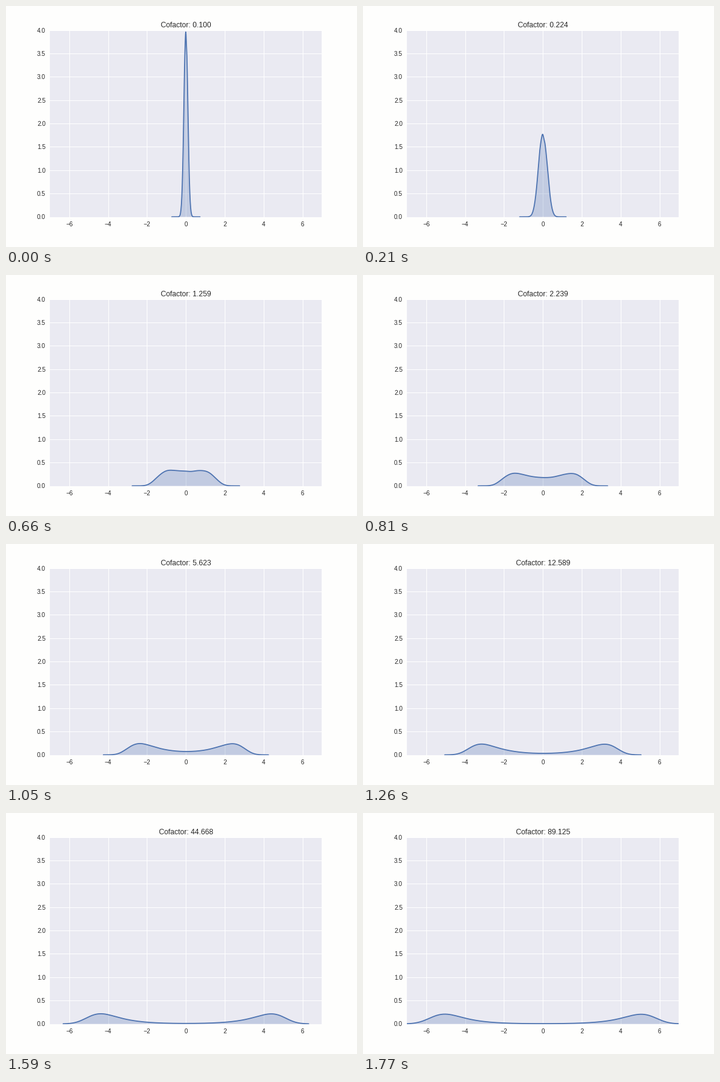
A matplotlib script for the animation above (1800 ms loop, 576 px wide and 396 px high).

```python
import numpy as np
import matplotlib.pyplot as plt
from matplotlib.animation import FuncAnimation

FRAMES, INTERVAL = 60, 30
BLUE, INK = "#4C72B0", "#262626"

plt.rcParams.update({
    "font.family": "Liberation Sans",
    "font.size": 10,
    "axes.unicode_minus": True,
    "text.color": INK,
    "xtick.color": INK,
    "ytick.color": INK,
})


def bump(x, centre, width):
    return np.exp(-0.5 * ((x - centre) / width) ** 2)


# Normal sample with the slight unevenness of a finite draw.
x = np.linspace(-6, 6, 2401)
weight = bump(x, 0, 1) * (1 + 0.015 * bump(x, -0.08, 0.12)
                          - 0.035 * bump(x, 0.22, 0.12)
                          + 0.04 * bump(x, -0.9, 0.25)
                          + 0.03 * bump(x, 1.2, 0.25))
weight /= weight.sum()


def density(cofactor):
    """Smoothed density of arcsinh(cofactor * x) on its support."""
    y = np.arcsinh(cofactor * x)
    mean = weight @ y
    width = 0.095 * np.sqrt(weight @ (y - mean) ** 2)
    reach = np.arcsinh(6.2 * cofactor) + 0.014 / cofactor
    grid = np.linspace(-reach, reach, 128)
    kernel = bump(grid[:, None], y[None, :], width)
    return grid, kernel @ weight / (width * np.sqrt(2 * np.pi))


fig = plt.figure(figsize=(8, 5.5), dpi=72, facecolor="#fefefd")
ax = fig.add_axes([0.125, 0.125, 0.775, 0.775], facecolor="#EAEAF2")
ax.set(xlim=(-7, 7), ylim=(0, 4),
       xticks=np.arange(-6, 7, 2), yticks=np.arange(0, 4.1, 0.5))
ax.set_axisbelow(True)
ax.grid(color="white", lw=1, ls="-")
ax.tick_params(length=0, pad=7, labelsize=10)
for spine in ax.spines.values():
    spine.set_visible(False)

title = ax.set_title("", fontsize=12, pad=5)
line, = ax.plot([], [], color=BLUE, lw=1.75, solid_capstyle="round")
area, = ax.fill([0, 0, 0], [0, 0, 0], fc=BLUE, alpha=0.25, lw=0)


def update(i):
    cofactor = 10 ** (-1 + i / 20)
    grid, height = density(cofactor)
    line.set_data(grid, height)
    area.set_xy(np.column_stack([np.r_[grid[0], grid, grid[-1]],
                                 np.r_[0, height, 0]]))
    title.set_text(f"Cofactor: {cofactor:.3f}")
    return line, area, title


anim = FuncAnimation(fig, update, frames=FRAMES, interval=INTERVAL,
                     repeat=True, repeat_delay=0, blit=False)
plt.show()
```
